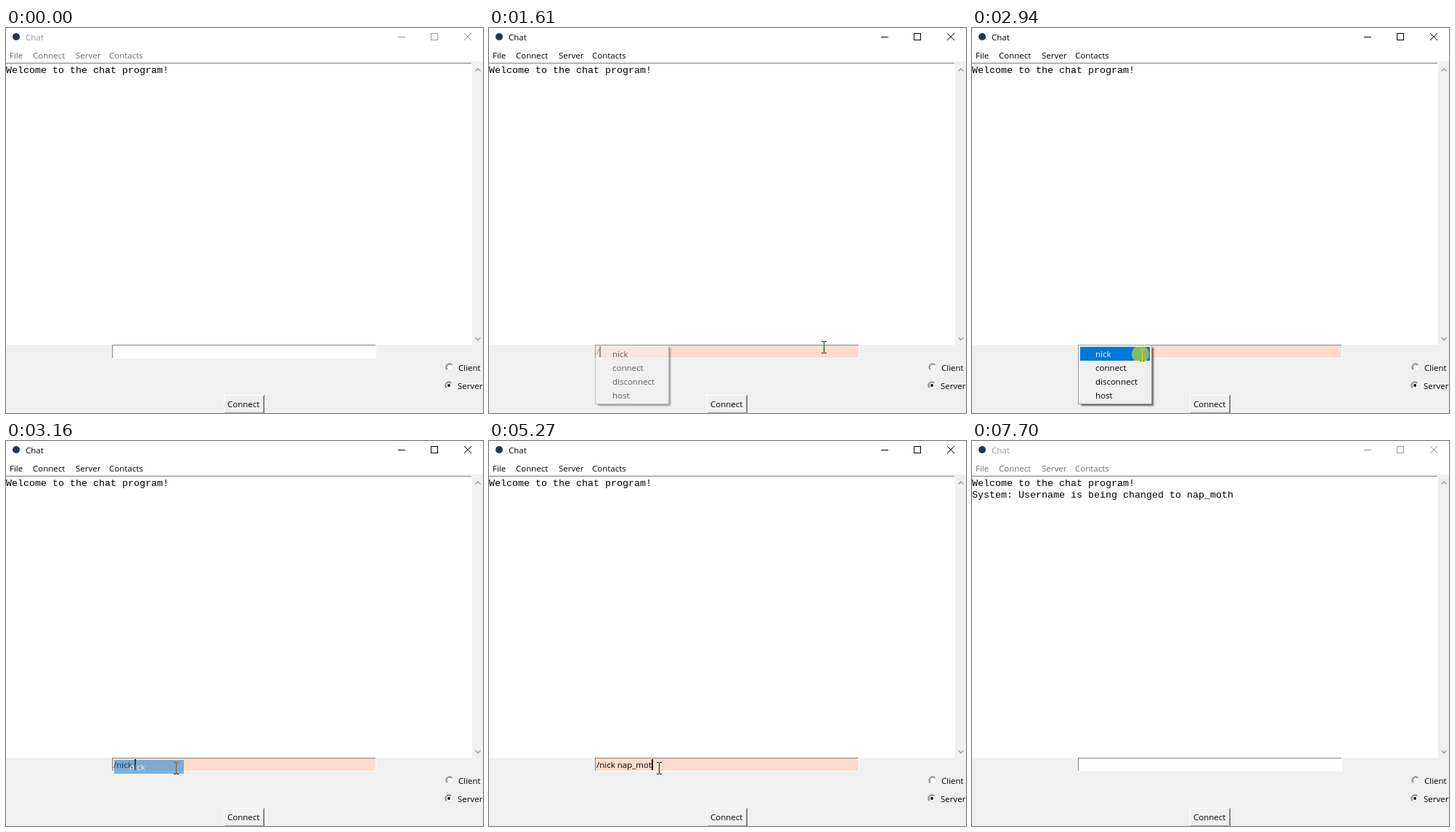
An HTML page that plays this animation: 657x530 px, repeating every 7.85 s.

```html
<!DOCTYPE html>
<html lang="en">
<head>
<meta charset="utf-8">
<title>Chat</title>
<style>
  html, body { margin: 0; width: 100%; height: 100%; overflow: hidden; background: #f0f0f0; }
  svg { display: block; width: 657px; height: 530px; }
  text { font: 11.5px "Open Sans", "Noto Sans", sans-serif; white-space: pre; }
  .log text { font: 13.333px "Liberation Mono", "Courier New", monospace; }
  .crisp { shape-rendering: crispEdges; }
  .line { fill: none; stroke: #000; }
  .idle .title { fill: #999; }
  .idle .bar { fill: #6d6d6d; }
  .idle .line { stroke: #999; }
  #beam { mix-blend-mode: difference; }
</style>
</head>
<body>
<svg id="win" viewBox="0 0 657 530">
  <defs>
    <filter id="blur" x="-10%" y="-10%" width="120%" height="120%"><feGaussianBlur stdDeviation="1"/></filter>
    <g id="radio">
      <circle r="5" fill="#fff" stroke="#e3e3e3"/>
      <path d="M-3.7 3.7A5.2 5.2 0 0 1 3.7-3.7" fill="none" stroke="#8a8a8a"/>
      <path d="M-2.9 2.9A4.1 4.1 0 0 1 2.9-2.9" fill="none" stroke="#696969"/>
    </g>
  </defs>

  <rect width="657" height="530" fill="#f0f0f0"/>
  <rect width="657" height="46" fill="#fff"/>

  <!-- title bar and menu bar -->
  <circle cx="14" cy="12" r="5" fill="#26384f"/>
  <text class="title" x="27" y="17">Chat</text>
  <g class="crisp line">
    <path class="line" d="M540 12.5h10"/>
    <rect class="line" x="585.5" y="7.5" width="9" height="9"/>
  </g>
  <path class="line" d="M631 7l10 10M641 7l-10 10"/>
  <g class="bar">
    <text x="5" y="42">File</text>
    <text x="37" y="42">Connect</text>
    <text x="96" y="42">Server</text>
    <text x="142" y="42">Contacts</text>
  </g>

  <!-- message log -->
  <g class="crisp">
    <rect y="48" width="642" height="388" fill="#fff"/>
    <rect y="48" width="641" height="1" fill="#868686"/>
  </g>
  <g class="log">
    <text x="0" y="62">Welcome to the chat program!</text>
    <text x="0" y="78" id="notice"></text>
  </g>
  <path d="M646.5 59.5l3.5-3.5l3.5 3.5M646.5 426l3.5 3.5l3.5-3.5" fill="none" stroke="#a8a8a8" stroke-width="1.7"/>

  <!-- entry -->
  <g class="crisp">
    <rect x="146" y="436" width="364" height="19" fill="#fff"/>
    <rect id="field" x="147" y="437" width="362" height="17" fill="#fff"/>
    <path d="M146 436.5h363M146.5 436v18" fill="none" stroke="#868686"/>
  </g>
  <text id="entry" x="148" y="450"></text>
  <rect id="caret" class="crisp" y="438" width="2" height="15"/>

  <!-- mode and button -->
  <use href="#radio" x="611" y="467"/>
  <use href="#radio" x="610" y="492"/>
  <circle cx="610" cy="492" r="2"/>
  <text x="623" y="472">Client</text>
  <text x="622" y="497">Server</text>
  <g class="crisp" fill="none">
    <path d="M300.500 530v-24.500h55" stroke="#fff"/>
    <path d="M301 529.500h53.500v-23" stroke="#a0a0a0"/>
    <path d="M355.500 505v25" stroke="#696969"/>
  </g>
  <text x="305" y="522">Connect</text>

  <!-- completion menu -->
  <g id="menu">
    <rect x="150" y="440" width="100" height="80" fill="#000" opacity=".6" filter="url(#blur)"/>
    <rect class="crisp" x="146.5" y="436.5" width="101" height="81" fill="#f0f0f0" stroke="#a0a0a0"/>
    <text x="170" y="453">nick</text>
    <text x="170" y="472">connect</text>
    <text x="170" y="491">disconnect</text>
    <text x="170" y="510">host</text>
  </g>
  <g id="pick">
    <rect class="crisp" x="149" y="439" width="96" height="19" fill="#0078d7"/>
    <text x="170" y="453" fill="#fff">nick</text>
  </g>

  <!-- pointer -->
  <path id="arrow" d="M.5.5v16l3.700-3.500l2.600 5.700l2.300-1l-2.500-5.500h5z" fill="#fff" stroke="#000"/>
  <path id="beam" class="crisp" d="M-3-7.500h3M1-7.500h3M.5-7v15M-3 8.500h3M1 8.500h3" fill="none" stroke="#fff"/>
  <circle id="click" r="12" fill="#ff0" opacity=".5"/>
</svg>

<script>
const LOOP = 7850;
const NAME = "nap_moth";
const KEYS = [3810, 4010, 4080, 4600, 5000, 5150, 5270, 5420];

// Pointer moves: start, end, steps, from, to
const MOVES = [
  [260, 660, 6, [565, 498], [461, 440]],
  [930, 930, 1, [461, 439], [461, 439]],
  [1930, 2250, 4, [445, 441], [258, 457]],
  [2250, 2540, 5, [258, 457], [234, 450]],
  [6570, 6730, 2, [252, 461], [415, 517]]
];

const el = {};
for (const node of document.querySelectorAll("[id]")) el[node.id] = node;

const within = (t, a, b) => t >= a && t < b;
const show = (node, on) => node.setAttribute("visibility", on ? "visible" : "hidden");
const place = (node, x, y) => node.setAttribute("transform", `translate(${x} ${y})`);
const write = (node, text) => { if (node.textContent !== text) node.textContent = text; };

function pointer(t) {
  const move = MOVES.findLast(m => t >= m[0]);
  if (!move || t >= 6820) return null;
  const [start, end, steps, from, to] = move;
  const p = end > start ? Math.min(1, (t - start) / (end - start)) : 1;
  const k = Math.floor(p * steps + 1e-6) / steps;
  const ease = k * (1.5 - k / 2);
  return from.map((v, i) => Math.round(v + (to[i] - v) * ease));
}

function typed(t) {
  if (t < 1530 || t >= 5870) return "";
  if (t < 2940) return "/";
  return "/nick " + NAME.slice(0, KEYS.filter(k => t >= k).length);
}

function drawEntry(t) {
  const text = typed(t);
  write(el.entry, text);
  const x = text ? Math.round(148 + el.entry.getComputedTextLength()) : 147;
  el.caret.setAttribute("x", x);
  show(el.caret, within(t, 1060, 7450) && !within(t, 3490, 3810) && !within(t, 6570, 6900));
  el.field.setAttribute("fill", within(t, 1600, 5950) ? "#ffdccc" : "#fff");
}

function drawMenu(t) {
  show(el.menu, within(t, 1600, 3020));
  el.menu.setAttribute("opacity", t < 1730 ? 0.6 : 1);
  show(el.pick, within(t, 2308, 3370));
  const fade = t < 3020 ? 0 : Math.floor((t - 3020) / 70) + 1;
  el.pick.setAttribute("opacity", 1 - fade / 6);
}

function drawPointer(t) {
  const at = pointer(t);
  const [x, y] = at || [0, 0];
  const overText = y < 436 || (y < 455 && x >= 146 && x < 510);
  const beam = overText && !within(t, 1930, 2940);
  show(el.beam, at && beam);
  show(el.arrow, at && !beam);
  show(el.click, within(t, 930, 1210) || within(t, 2860, 3140));
  place(el.beam, x, y);
  place(el.arrow, x, y);
  place(el.click, x - 2, y - 1);
}

function draw(now) {
  const t = now % LOOP;
  el.win.setAttribute("class", within(t, 930, 7700) ? "" : "idle");
  write(el.notice, t >= 5870 ? "System: Username is being changed to " + NAME : "");
  drawEntry(t);
  drawMenu(t);
  drawPointer(t);
}

const begin = performance.now();
function tick() {
  draw(performance.now() - begin);
  requestAnimationFrame(tick);
}
tick();
</script>
</body>
</html>
```
